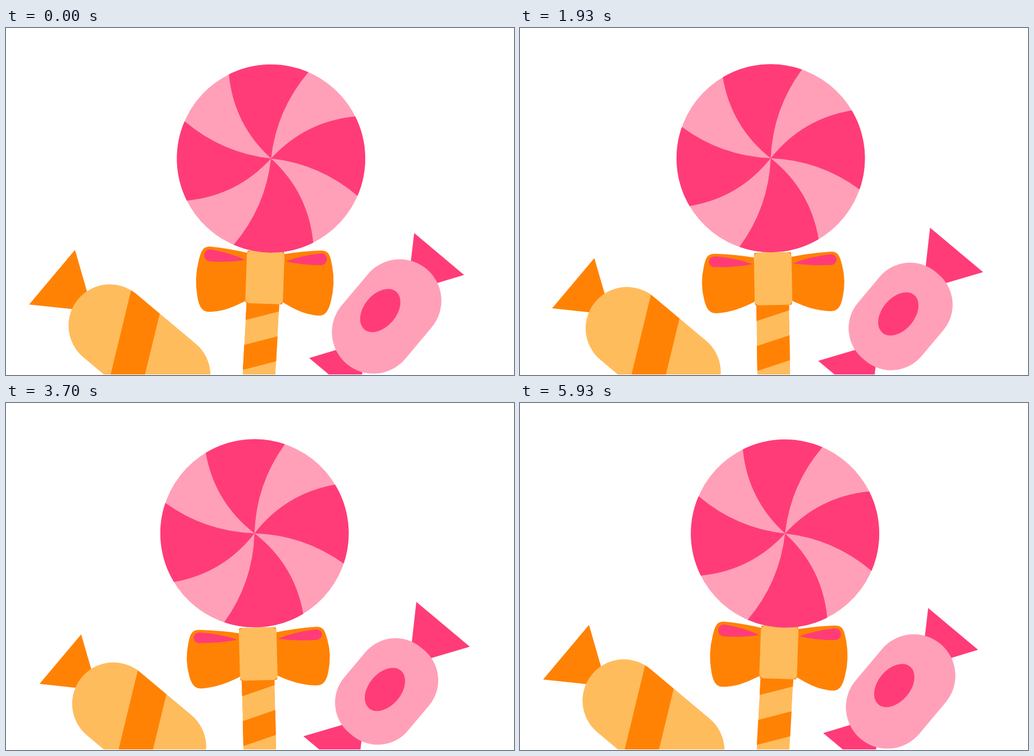
Write an HTML page with a canvas that moves like this. It is 905 by 619 pixels and loops after 6.01 s.

```html
<!DOCTYPE html>
<html lang="en">
<head>
<meta charset="utf-8">
<title>Candies</title>
<style>
html, body { margin: 0; width: 100%; height: 100%; overflow: hidden; background: #fff; }
canvas { display: block; }
</style>
</head>
<body>
<canvas id="stage" width="905" height="619"></canvas>
<script>
const ctx = document.getElementById('stage').getContext('2d');
const PINK = '#ff3c78', ROSE = '#ffa0b8', ORANGE = '#ff8204', HONEY = '#ffbc5c';
const LOOP = 6010, STEPS = 120, CYCLE = 60;
const rad = deg => deg * Math.PI / 180;
const mix = (a, b, k) => a + (b - a) * k;

// cubic-bezier(.4, 0, .2, 1)
function ease(x) {
  const curve = (s, a, b) => 3 * (1 - s) ** 2 * s * a + 3 * (1 - s) * s * s * b + s ** 3;
  let lo = 0, hi = 1;
  for (let i = 0; i < 24; i++) {
    const s = (lo + hi) / 2;
    if (curve(s, 0.4, 0.2) < x) lo = s; else hi = s;
  }
  return curve(lo, 0, 1);
}

// Steps alternate between 30 and 70 ms.
function swingAt(time) {
  const step = Math.min(STEPS - 1, 2 * Math.floor(time / 100) + (time % 100 >= 30 ? 1 : 0));
  const phase = step % CYCLE / CYCLE * 2;
  return phase < 1 ? ease(phase) : 1 - ease(phase - 1);
}

function placed(x, y, deg, draw) {
  ctx.save();
  ctx.translate(x, y);
  ctx.rotate(rad(deg));
  draw();
  ctx.restore();
}

function poly(color, ...pts) {
  ctx.fillStyle = color;
  ctx.beginPath();
  pts.forEach(([x, y]) => ctx.lineTo(x, y));
  ctx.fill();
}

function pill(color, x0, x1, mid, half, r) {
  ctx.fillStyle = color;
  ctx.beginPath();
  ctx.roundRect(x0, mid - half, x1 - x0, 2 * half, r);
  ctx.fill();
}

function shape(color, path) {
  ctx.fillStyle = color;
  ctx.fill(new Path2D(path));
}

function orangeCandy(p) {
  const mid = 287.8, half = 73.6, top = mid - half, bottom = mid + half;
  const base = mix(348.6, 375, p), flare = mix(63.6, 55.5, p);
  poly(ORANGE, [base, mid - flare], [base, mid + flare], [mix(443, 458, p), mid]);
  pill(HONEY, mix(483, 494.5, p) - half, mix(621, 607.3, p) + half, mid, half, half);
  ctx.clip();
  const left = mix(471, 492, p), right = mix(537.3, 558.5, p), slant = 73;
  poly(ORANGE, [left, top], [right, top], [right + slant, bottom], [left + slant, bottom]);
}

function pinkCandy(p) {
  const cx = 41.7, cy = 850.2;
  const base = mix(145.5, 160.5, p), flare = mix(58, 63.8, p), apex = mix(57, 65, p);
  for (const side of [-1, 1]) {
    poly(PINK, [cx + side * base, cy - flare], [cx + side * base, cy + flare], [cx + side * apex, cy]);
  }
  const len = mix(110.6, 95.3, p);
  pill(ROSE, cx - len, cx + len, cy, 74, mix(74, 68.7, p));
  ctx.fillStyle = PINK;
  ctx.beginPath();
  ctx.ellipse(42.5, mix(834.7, 849.6, p), 44, 29, 0, 0, 2 * Math.PI);
  ctx.fill();
}

function stick() {
  ctx.beginPath();
  ctx.rect(-29.5, -120, 58.5, 160);
  ctx.clip();
  ctx.fillStyle = HONEY;
  ctx.fill();
  for (const y of [-77, 12]) {
    poly(ORANGE, [-30, y - 44.5], [30, y - 63.5], [30, y - 19], [-30, y]);
  }
}

function bow(p) {
  const w = mix(123, 129.8, p), h = mix(58, 50, p);
  const wing = `M30 ${-.84 * h} Q68 ${-.97 * h} ${w - 24} ${-h}
    C${w - 10} ${-h} ${w - 8} ${-.85 * h} ${w - 4} ${-.55 * h}
    Q${w + 3} 0 ${w - 4} ${.55 * h}
    C${w - 8} ${.88 * h} ${w - 14} ${1.03 * h} ${w - 29} ${h}
    C${w - 50} ${.97 * h} 58 ${.87 * h} 30 ${.6 * h} Z`;
  const shine = `M36 ${-.63 * h} Q65 ${-.84 * h} ${w - 26} ${-.91 * h}
    C${w - 10} ${-.94 * h} ${w - 10} ${-.56 * h} ${w - 24} ${-.55 * h}
    Q65 ${-.53 * h} 36 ${-.63 * h} Z`;
  for (const side of [-1, 1]) {
    ctx.save();
    ctx.scale(side, 1);
    shape(ORANGE, wing);
    shape(PINK, shine);
    ctx.restore();
  }
  pill(ORANGE, -33, 33, -6.5, 47, 3);
  pill(HONEY, -33.5, 33.5, -6.5, 47, 8);
}

function swirl() {
  const r = 167.8, cx = 0, cy = -367.3;
  const at = (radius, deg) => [cx + radius * Math.cos(rad(deg)), cy + radius * Math.sin(rad(deg))];
  const bend = (deg, lead) => at(r / 2 / Math.cos(rad(lead)), deg - lead);
  ctx.fillStyle = ROSE;
  ctx.beginPath();
  ctx.arc(cx, cy, r, 0, 2 * Math.PI);
  ctx.fill();
  ctx.fillStyle = PINK;
  for (let i = 0; i < 4; i++) {
    const from = 240.25 + 90 * i, to = from + 50;
    ctx.beginPath();
    ctx.moveTo(cx, cy);
    ctx.quadraticCurveTo(...bend(from, 21), ...at(r, from));
    ctx.arc(cx, cy, r, rad(from), rad(to));
    ctx.quadraticCurveTo(...bend(to, 17), cx, cy);
    ctx.fill();
  }
}

function frame(now) {
  const p = swingAt(now % LOOP);
  const tilt = mix(3.15, -3.15, p);
  ctx.clearRect(0, 0, 905, 619);
  ctx.save();
  ctx.beginPath();
  ctx.rect(0, 0, 905, 618);
  ctx.clip();
  placed(0, 0, 40, () => orangeCandy(p));
  placed(0, 0, -50, () => pinkCandy(p));
  placed(452, 599.6, tilt, stick);
  placed(mix(461, 445.2, p), mix(451.5, 455.2, p), mix(2, -2.8, p), () => bow(p));
  placed(452, 599.6, tilt, swirl);
  ctx.restore();
}

let start;
function tick(now) {
  start ??= now;
  frame(now - start);
  requestAnimationFrame(tick);
}
frame(0);
requestAnimationFrame(tick);
</script>
</body>
</html>
```
